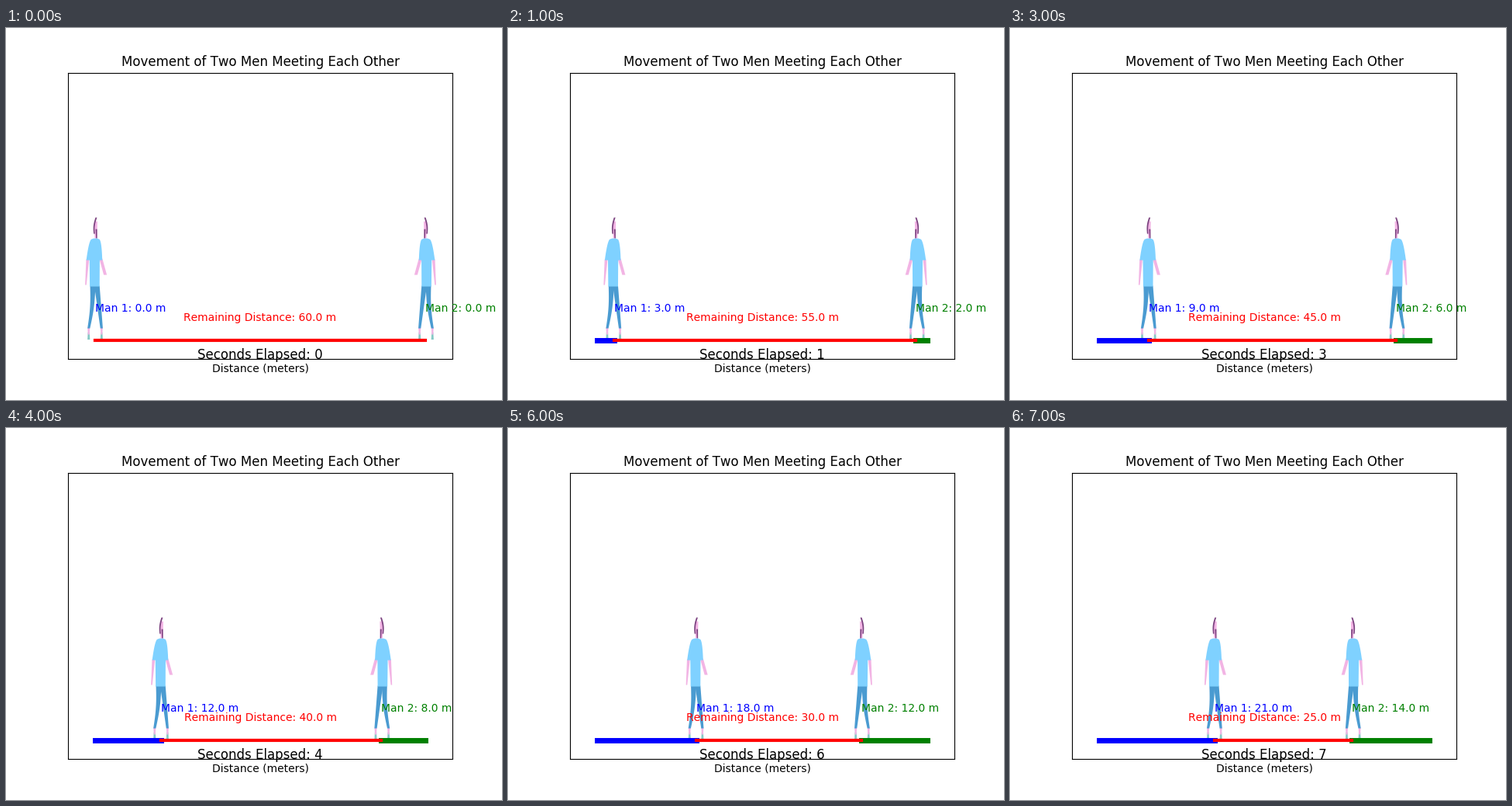
These frames come from a looping animation (640 by 480 pixels, 8 s). A matplotlib script:

```python
import numpy as np
import matplotlib.pyplot as plt
from matplotlib.animation import FuncAnimation
from matplotlib.patches import Polygon

plt.rcParams["text.kerning_factor"] = 6  # whole-pixel kerning

SECONDS = 8
GAP = 60
SPEED_1, SPEED_2 = 3, 2
PX_X, PX_Y = 496 / 70, 369.6 / 15  # pixels per data unit
NUDGE = 0.5 / PX_X  # figures sit half a pixel to the right

SKIN, HAIR, SHIRT = "#f2b4e4", "#7d4481", "#7fd1ff"
TROUSERS, SHOE = "#4a9bd1", "#86c9c6"


def band(color, top, bottom, w_top, w_bottom, bend=0, ease=1):
    """Tapered band between two points, in pixels from the spot underfoot."""
    t = np.linspace(0, 1, 24)
    x = top[0] + (bottom[0] - top[0]) * t + bend * np.sin(np.pi * t)
    y = top[1] + (bottom[1] - top[1]) * t
    half = (w_top + (w_bottom - w_top) * t ** ease) / 2
    left, right = np.c_[x - half, y], np.c_[x + half, y]
    return color, np.vstack([left, right[::-1]])


def leg(hip, foot, bend=0):
    return [band(SHOE, (foot, 10), (foot, 0.5), 2.2, 3.2),
            band(SKIN, (foot, 16), (foot, 7), 3, 2),
            band(TROUSERS, (hip, 70), (foot, 15), 6.8, 3.2, bend)]


# A walker facing right
BODY = [
    band(SKIN, (0, 153), (0, 131), 4, 3),
    band(HAIR, (0.5, 158), (-2, 137), 2, 1.6, bend=-1.4),
    band(HAIR, (0.6, 143), (1, 131), 2, 1.4),
    band(SKIN, (-10.6, 104), (-13, 71), 3.8, 1.6),
    band(SKIN, (6.4, 105), (12.2, 84), 4, 4),
    *leg(-4, -9.2, bend=1.6),
    *leg(1.4, 7.4),
    band(SHIRT, (-0.6, 131), (-2, 103), 4.8, 20.6, ease=0.3),
    band(SHIRT, (-1.6, 104), (-1.5, 69), 13.2, 12.6),
]


class Walker:
    def __init__(self, ax, side):
        self.side = side
        self.parts = [(ax.add_patch(Polygon(points, fc=color, ec="none")), points)
                      for color, points in BODY]

    def move(self, x):
        for patch, points in self.parts:
            patch.set_xy(points * [self.side / PX_X, 1 / PX_Y] + [x + NUDGE, 0])


fig, ax = plt.subplots(figsize=(6.4, 4.8), dpi=100)
ax.set(xlim=(-5, 65), ylim=(-1, 14), xticks=[], yticks=[],
       xlabel="Distance (meters)", title="Movement of Two Men Meeting Each Other")

man_1, man_2 = Walker(ax, 1), Walker(ax, -1)
path_1, = ax.plot([], [], color="blue", lw=5)
path_2, = ax.plot([], [], color="green", lw=5)
between, = ax.plot([], [], color="red", lw=3)
label_1 = ax.text(0, 1.5, "", color="blue")
label_2 = ax.text(GAP, 1.5, "", color="green")
remaining = ax.text(GAP / 2, 1, "", color="red", ha="center")
clock = ax.text(GAP / 2, -1, "", fontsize=12, ha="center")


def update(second):
    walked_1, walked_2 = SPEED_1 * second, SPEED_2 * second
    x1, x2 = walked_1, GAP - walked_2
    man_1.move(x1)
    man_2.move(x2)
    path_1.set_data([0, x1], [0, 0])
    path_2.set_data([GAP, x2], [0, 0])
    path_1.set_visible(second > 0)
    path_2.set_visible(second > 0)
    between.set_data([x1, x2], [0, 0])
    label_1.set_x(x1)
    label_1.set_text(f"Man 1: {walked_1:.1f} m")
    label_2.set_x(x2)
    label_2.set_text(f"Man 2: {walked_2:.1f} m")
    remaining.set_text(f"Remaining Distance: {x2 - x1:.1f} m")
    clock.set_text(f"Seconds Elapsed: {second}")


anim = FuncAnimation(fig, update, frames=SECONDS, interval=1000, repeat=True,
                     repeat_delay=0)
plt.show()
```
